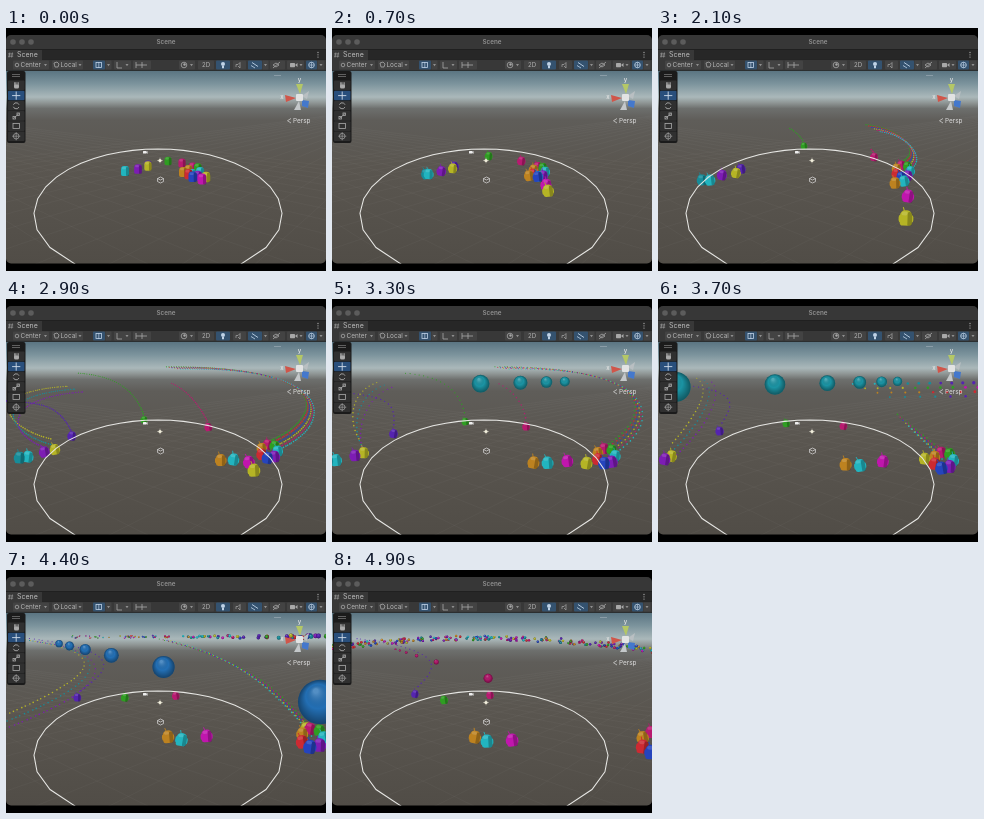
An HTML page with a canvas that plays this animation: 320 by 243 pixels, repeating every 5 s.

```html
<!DOCTYPE html>
<html lang="en">
<head>
<meta charset="utf-8">
<title>Scene</title>
<style>
html, body { margin: 0; width: 100%; height: 100%; overflow: hidden; background: #000; }
canvas { display: block; width: 320px; height: 243px; }
</style>
</head>
<body>
<canvas id="stage" width="320" height="243"></canvas>
<script>
const g = document.getElementById('stage').getContext('2d');
const LOOP = 5000, STEP = 100, TURN = 2100, END = 4900, TAU = Math.PI * 2;
const C = {
  cyan: '#22b4bf', teal: '#178c99', violet: '#5524b0', purple: '#7d1cb4', yellow: '#b5b425',
  green: '#2f9d22', magenta: '#c016ad', pink: '#b81a70', orange: '#bd8220', red: '#cc2a32', blue: '#2544bd'
};
const PALETTE = Object.values(C);
const lerp = (a, b, u) => a + (b - a) * u;
const mix = (p, q, u) => p.map((v, k) => lerp(v, q[k], u));
const ramp = (t, from, to) => Math.min(1, Math.max(0, (t - from) / (to - from)));
const rand = n => { const s = Math.sin(n * 127.1 + 11.7) * 43758.5453; return s - Math.floor(s); };

// ---- drawing helpers ----
function rect(x, y, w, h, fill, r = 0) {
  g.fillStyle = fill;
  g.beginPath();
  g.roundRect(x, y, w, h, r);
  g.fill();
}
function dot(x, y, r, fill) {
  g.fillStyle = fill;
  g.beginPath();
  g.arc(x, y, r, 0, TAU);
  g.fill();
}
function line(pts, color, width = 1, close = false) {
  g.strokeStyle = color;
  g.lineWidth = width;
  g.beginPath();
  pts.forEach(([x, y]) => g.lineTo(x, y));
  if (close) g.closePath();
  g.stroke();
}
function cross(x, y, r, color, width = .6) {
  line([[x - r, y], [x + r, y]], color, width);
  line([[x, y - r], [x, y + r]], color, width);
}
function poly(pts, fill) {
  g.fillStyle = fill;
  g.beginPath();
  pts.forEach(([x, y]) => g.lineTo(x, y));
  g.fill();
}
function ring(x, y, r, color, width = 1, from = 0, to = TAU) {
  g.strokeStyle = color;
  g.lineWidth = width;
  g.beginPath();
  g.arc(x, y, r, from, to);
  g.stroke();
}
function text(s, x, y, size, fill, weight = 400, align = 'left') {
  g.font = `${weight} ${size}px Inter, Roboto, sans-serif`;
  g.textAlign = align;
  g.textBaseline = 'middle';
  g.fillStyle = fill;
  g.fillText(s, x, y);
}
function ball(x, y, r, color) {
  dot(x, y, r, color);
  const s = g.createRadialGradient(x - r * .2, y - r * .5, r * .1, x, y, r);
  s.addColorStop(0, 'rgba(255,255,255,.22)');
  s.addColorStop(.5, 'rgba(0,0,0,0)');
  s.addColorStop(1, 'rgba(0,0,0,.4)');
  dot(x, y, r, s);
}

// ---- creatures: straight out to a turning point, then on along a bowed path ----
function walker(color, start, turn, end, bow = [0, 0]) {
  const at = t => {
    if (t < TURN) return mix(start, turn, t / TURN);
    const u = ramp(t, TURN, END), s = Math.sin(u * Math.PI);
    return mix(turn, end, u ** 1.15).map((v, k) => v + bow[k] * s);
  };
  return { color, at };
}
const yellow = walker(C.yellow, [142, 138], [78, 145], [-45, 168]);
const violet = walker(C.violet, [142, 137], [83, 141], [83, 124], [-22, 0]);
const green = walker(C.green, [162, 133], [146, 118], [112, 130]);
const pink = walker(C.pink, [176, 135], [216, 129], [158, 125]);
const herd = walker('', [188, 144], [245, 143], [322, 172], [0, 3]);
const walkers = [
  yellow, violet, green, pink,
  walker(C.teal, [119, 143], [44, 152], [-85, 180]),
  walker(C.cyan, [119, 143], [52, 152], [-75, 176]),
  walker(C.purple, [132, 141], [64, 147], [-45, 172]),
  walker(C.orange, [177, 144], [237, 155], [143, 167], [0, 4]),
  walker(C.cyan, [186, 146], [246, 153], [155, 171], [4, 4]),
  walker(C.magenta, [196, 151], [250, 168], [180, 170], [12, -7]),
  walker(C.yellow, [200, 149], [248, 190], [330, 160], [-25, -15])
];
const members = ['pink', 'orange', 'red', 'blue', 'purple', 'cyan', 'green'];

function creature(x, y, color, t, n) {
  const s = Math.min(1.6, Math.max(.6, (y - 58) / 86));
  g.save();
  g.translate(x, y);
  g.scale(s, s);
  if (t >= 600) {
    g.rotate(Math.sin(t / 260 + n * 2) * .18);
    line([[-1, -4], [-2, -7]], color, .7);
    rect(-4.8, -2, 9.6, 5, color, 1.5);
  }
  rect(-4, -5, 8, 10, color, [3.5, 3.5, 2, 2]);
  rect(1, -4, 3, 9, 'rgba(0,0,0,.25)', [2, 3, 2, 1]);
  rect(-3, -4.2, 4, 2.5, 'rgba(255,255,255,.14)', 1.2);
  g.restore();
}
function drawCreatures(t) {
  const list = walkers.map(w => [...w.at(t), w.color]);
  const [hx, hy] = herd.at(t), spread = 5.5 + 6 * (t / END) ** 2;
  members.forEach((name, i) => {
    const a = -1.8 - i * TAU / members.length;
    list.push([hx + Math.cos(a) * spread * 1.1, hy + Math.sin(a) * spread * .9, C[name]]);
  });
  list.map((w, n) => [...w, t, n]).sort((a, b) => a[1] - b[1]).forEach(w => creature(...w));
}

// ---- trails: curves from a walker to the distance, morphing from a to b ----
const trails = [
  { head: herd, colors: ['green', 'red', 'blue', 'yellow', 'pink', 'cyan'], gap: 2.2, life: [1600, 3400], morph: [2100, 2900],
    a: [[268, 130], [250, 104], [214, 100]], b: [[325, 125], [335, 66], [165, 69]] },
  { head: herd, colors: ['green', 'pink', 'blue', 'yellow', 'cyan'], gap: 3, life: [3400, 4700], morph: [3700, 4400],
    a: [[262, 136], [242, 120], [227, 103]], b: [[268, 115], [230, 88], [160, 70]] },
  { head: violet, colors: ['violet'], life: [2300, LOOP], morph: [2900, 4400],
    a: [[52, 105], [35, 104], [0, 102]], b: [[95, 105], [135, 82], [20, 68]] },
  { head: yellow, colors: ['yellow', 'teal', 'purple'], gap: 6, life: [2300, 4800], morph: [2900, 4400],
    a: [[0, 135], [-20, 96], [70, 90]], b: [[70, 125], [140, 86], [20, 70]] },
  { head: green, colors: ['green'], life: [1600, 3500], morph: [2100, 2900],
    a: [[142, 108], [137, 103], [131, 100]], b: [[130, 92], [110, 76], [70, 74]] },
  { head: pink, colors: ['pink'], life: [2000, 3500], morph: [2100, 2900],
    a: [[212, 120], [210, 118], [208, 116]], b: [[193, 105], [180, 90], [165, 84]] }
];
function bezier(p, u) {
  while (p.length > 1) p = p.slice(1).map((q, i) => mix(p[i], q, u));
  return p[0];
}
function drawTrail({ head, colors, gap = 0, life, morph, a, b }, t) {
  if (t < life[0] || t >= life[1]) return;
  const m = ramp(t, ...morph), grown = ramp(t, life[0] - 100, life[0] + 500);
  const [hx, hy] = head.at(t);
  const pts = [[hx, hy - 4], ...a.map((p, i) => mix(p, b[i], m))];
  const space = t < 3200 ? 2.2 : 4.5;
  colors.forEach((name, n) => {
    const off = (n - (colors.length - 1) / 2) * gap;
    let prev = pts[0], run = 0;
    for (let u = 0; u <= grown; u += .005) {
      const p = bezier(pts, u);
      run += Math.hypot(p[0] - prev[0], p[1] - prev[1]);
      prev = p;
      if (run < space) continue;
      run -= space;
      const near = Math.min(1, Math.max(.2, (p[1] - 62) / 60));
      dot(p[0] + off * (.3 + u), p[1] + off * near, .45 + .35 * near, C[name]);
    }
  });
}

// rows of beads leading off to the right
function drawRows(t) {
  if (t < 3400 || t >= 4200) return;
  for (let row = 0; row < 4; row++) {
    const z = 1 / (1 + row * .3);
    for (let i = 0; i < 14; i++) {
      const x = 192 + row * 12 + (i + (t / 400) % 1) * 11 / z ** .5;
      dot(x, 85 + row * 4.5 - (x - 192) * .01, .9 + i * .07, PALETTE[(row * 4 + (i >> 2)) % PALETTE.length]);
    }
  }
}
// beads gathering along the horizon
function drawBand(t) {
  const v = ramp(t, 4400, END), count = 90 * ramp(t, 3700, 4300) + 120 * v;
  for (let i = 0; i < count; i++) {
    const x = lerp(lerp(60, 0, v), 322, (rand(i) + 1 - t / 20000) % 1);
    const y = 65.5 + 11 * v * ((x - 150) / 160) ** 2 + rand(i + 300) * lerp(2.5, 5, v);
    ball(x, y, lerp(.5 + 2 * (x / 320) ** 2, 1.2, v), PALETTE[i % PALETTE.length]);
  }
}

// ---- rows of large balls in perspective: z and x step evenly, size is 1 / z ----
const flights = [
  { color: '#1b93a3', at: 3700, pace: 260, life: [3200, 4100], z: [.067, .03], x: [-9, 5.6], y: [80, .53] },
  { color: '#236fb4', at: 4400, pace: 210, life: [4000, 4800], z: [.045, .045], x: [7.3, -6.8], y: [62, 3.15] },
  { color: '#b0186a', at: 4900, pace: 220, life: [4600, LOOP], z: [.22, .18], x: [.9, -20], y: [72, 8] }
];
function drawFlight({ color, at, pace, life, z, x, y }, t) {
  if (t < life[0] || t >= life[1]) return;
  for (let k = 5; k >= 0; k--) {
    const j = k - (t - at) / pace, depth = z[0] + z[1] * j;
    if (depth < .02 || j > 5.1) continue;
    const r = 1 / depth;
    ball(152 + (x[0] + x[1] * j) * r, y[0] + y[1] * r, r, color);
  }
}

// ---- scenery ----
function drawWorld() {
  const sky = g.createLinearGradient(0, 42, 0, 235);
  [[0, '#587280'], [.07, '#7b939c'], [.14, '#aab8ba'], [.17, '#8f9695'], [.2, '#6d6f6d'],
    [.26, '#5f5d59'], [.5, '#5a5650'], [1, '#514d47']].forEach(s => sky.addColorStop(...s));
  rect(0, 42, 320, 194, sky);
  g.save();
  g.beginPath();
  g.rect(0, 84, 320, 152);
  g.clip();
  for (let i = -9; i < 16; i++) {
    line([[-190, 73], [i * 75, 240]], 'rgba(190,190,190,.07)', .6);
    line([[430, 73], [320 - i * 75, 240]], 'rgba(190,190,190,.07)', .6);
  }
  g.restore();
}
// ground circle of radius .574 seen from distance 1
function drawHoop() {
  const pts = Array.from({ length: 32 }, (_, i) => {
    const a = i * TAU / 32, z = 1 + .574 * Math.cos(a);
    return [152 + 101.6 * Math.sin(a) / z, 72 + 77.1 / z];
  });
  line(pts, '#e6e6e3', 1.05, true);
}
function drawGizmos() {
  drawHoop();
  rect(137, 123, 3.5, 2.6, '#eee', .5);
  poly([[140, 124.3], [141.5, 123], [141.5, 126]], '#eee');
  cross(154, 132.5, 2.8, '#d8d6c8');
  dot(154, 132.5, 1.6, '#f2efdc');
  line([[151.5, 150.5], [154.5, 149], [157.5, 150.5], [157.5, 153.5], [154.5, 155], [151.5, 153.5]], '#ddd', .7, true);
  line([[151.5, 150.5], [154.5, 152], [157.5, 150.5]], '#ddd', .7);

  rect(268, 47, 7, .8, 'rgba(220,225,230,.4)');
  poly([[303, 63], [296, 68], [301, 71]], '#b9bfc2');
  poly([[290, 56], [297, 56], [294, 66]], '#b4c766');
  poly([[279, 67], [280, 74], [290, 70]], '#d0564a');
  poly([[288, 82], [295, 82], [293, 73]], '#c4c8ca');
  poly([[296, 72], [303, 73], [302, 80], [296, 78]], '#4478cc');
  rect(290, 66, 7, 7, '#e2e3e3', 1);
  text('y', 293.5, 52, 6, '#e4e4e4', 500, 'center');
  text('x', 276, 69, 6, '#e4e4e4', 500, 'center');
  line([[285, 90.5], [281.5, 92.7], [285, 95]], '#ddd', .7);
  text('Persp', 287, 93, 6.4, '#ddd');
}

function drawTools() {
  const ink = '#a9a9a9';
  rect(1, 43, 18.5, 72, '#1b1b1b', 2);
  rect(6, 46.2, 8, .7, '#777');
  rect(6, 48, 8, .7, '#777');
  for (let i = 0; i < 6; i++) rect(2, 52.5 + i * 10.2, 16.5, 9.6, i === 1 ? '#294f7c' : '#303030', 1);
  rect(8, 56.5, 5, 4, ink, 1.5);
  for (let i = 0; i < 4; i++) rect(8 + i * 1.3, 54.2, .8, 4, ink);
  cross(10.2, 67.6, 4.1, '#d0dcea', .9);
  ring(10.2, 77.8, 3, ink, .9, .4, 2.8);
  ring(10.2, 77.8, 3, ink, .9, 3.5, 5.9);
  line([[7.5, 90.5], [13, 85.5]], ink, .8);
  g.strokeRect(7, 88.5, 2.5, 2.5);
  g.strokeRect(11, 85, 2.5, 2.5);
  g.strokeRect(7, 95.5, 6.5, 5);
  ring(10.2, 108.2, 2.8, ink, .7);
  cross(10.2, 108.2, 4.1, ink);
}

function arrow(x) { poly([[x - 1.5, 36], [x + 1.5, 36], [x, 38.2]], '#8f8f8f'); }
function button(x, w, on) { rect(x, 32.5, w, 9, on ? '#34526f' : '#434343', 1); }
function drawChrome() {
  const ink = '#a8a8a8', lit = '#bfd2e6';
  rect(0, 7, 320, 14.5, '#373737');
  [7, 16, 25].forEach(x => dot(x, 14, 2.8, '#5c5c5c'));
  text('Scene', 160, 14, 6.3, '#929292', 600, 'center');
  rect(0, 21.5, 320, 10, '#272727');
  rect(0, 22, 36, 10, '#383838');
  for (let i = 0; i < 2; i++) {
    line([[3.8 + i * 2.6, 24.5], [3 + i * 2.6, 29.5]], ink, .6);
    line([[2, 25.9 + i * 2.3], [7.2, 25.9 + i * 2.3]], ink, .6);
  }
  text('Scene', 11, 27, 7, '#bdbdbd');
  for (let i = 0; i < 3; i++) dot(312, 24.5 + i * 2.3, .65, ink);
  rect(0, 31.5, 320, 11, '#383838');
  rect(0, 42.2, 320, .8, '#222');

  button(7, 36); button(46, 31);
  ring(11, 37, 1.8, ink, .8);
  text('Center', 14.5, 37.1, 6.4, '#b5b5b5');
  line([[48, 35], [51, 34], [53, 36], [52, 39], [49, 39]], ink, .8, true);
  text('Local', 54.5, 37.1, 6.4, '#b5b5b5');

  button(87, 12, true); button(99.5, 6); button(108, 17); button(127, 18);
  g.strokeStyle = lit;
  g.strokeRect(90, 34.5, 5.5, 5);
  line([[92.8, 34], [92.8, 40]], lit, .7);
  line([[111, 34], [111, 40], [116, 40]], ink, .8);
  line([[130, 34], [130, 40]], ink, .8);
  line([[136, 34], [136, 40]], ink, .8);
  line([[130, 37], [141, 37]], ink, .8);

  button(173, 16); button(192, 16); button(210, 14, true); button(227, 13);
  button(242, 14, true); button(256.5, 6); button(264, 15); button(281, 17);
  button(300, 11, true); button(311.5, 7);
  ring(178, 37, 2.8, ink, .8);
  dot(178.5, 36.5, 1.2, ink);
  text('2D', 200, 37.1, 6, '#b5b5b5', 400, 'center');
  dot(217, 36, 2, lit);
  rect(216, 38, 2, 2.3, lit);
  line([[230, 39], [230, 36.5], [232, 36.5], [234, 34.5], [234, 40], [232, 38]], ink, .7);
  line([[246, 34.5], [252, 38.5]], lit, .9);
  line([[245, 37.5], [249, 40]], lit, .8);
  line([[267, 37], [270, 35], [273, 37], [270, 39]], ink, .8, true);
  line([[267, 40], [274, 34]], ink, .8);
  rect(284, 35, 5, 4.3, ink, .7);
  poly([[289, 37], [291.5, 35], [291.5, 39]], ink);
  ring(305.5, 37, 2.8, lit, .8);
  cross(305.5, 37, 2.8, lit);
  [39.5, 74, 102.5, 121, 185.5, 259.5, 295, 315].forEach(arrow);
}

function draw(t) {
  rect(0, 0, 320, 243, '#000');
  g.save();
  g.beginPath();
  g.roundRect(0, 7, 320, 228.5, 5);
  g.clip();
  drawWorld();
  drawBand(t);
  drawRows(t);
  trails.forEach(tr => drawTrail(tr, t));
  drawCreatures(t);
  flights.forEach(f => drawFlight(f, t));
  drawGizmos();
  drawTools();
  drawChrome();
  g.restore();
}

let start;
function tick(now) {
  start ??= now;
  draw(Math.floor(((now - start) % LOOP) / STEP) * STEP);
  requestAnimationFrame(tick);
}
draw(0);
requestAnimationFrame(tick);
</script>
</body>
</html>
```
